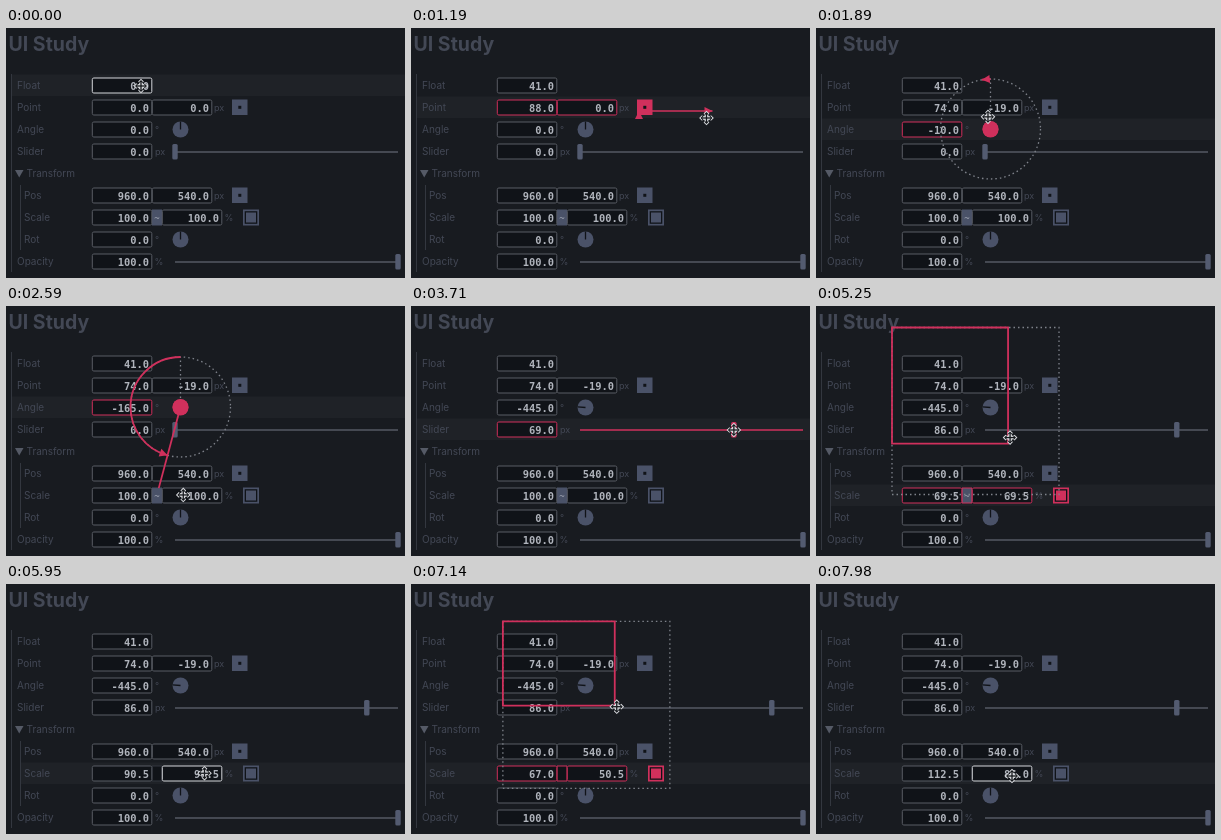
Recreate the animation shown at these times as an HTML page with a canvas. Size 399x250 px, loop 8 s.

```html
<!DOCTYPE html>
<html lang="en">
<head>
<meta charset="utf-8">
<title>UI Study</title>
<style>
html, body { margin: 0; width: 100%; height: 100%; overflow: hidden; background: #181b20; }
canvas { display: block; }
</style>
</head>
<body>
<canvas id="stage" width="399" height="250"></canvas>
<script>
const c = document.getElementById('stage').getContext('2d');
const LOOP = 8000, STEP = 70, GLIDE = 350, UNIT = 0.835, TAU = Math.PI * 2;
const BG = '#181b20', DARK = '#101318', DIM = '#434855', ICON = '#4a5268', RED = '#d0305c', EDGE = '#595d64';
const DIAL = { x: 174.5, y: 101 }, ORIGIN = { x: 228, y: 83 }, GRIP = { x: 243, y: 188.5 };
const SANS = 'Inter, Roboto, sans-serif', MONO = '"DejaVu Sans Mono", monospace';
const ROWS = ['float', 'point', 'angle', 'slider', 'transform', 'pos', 'scale', 'rot', 'opacity'];

const rowY = i => 57.5 + 22 * i;
const clamp = u => Math.min(1, Math.max(0, u));
const mix = (a, b, u) => a + (b - a) * u;
const swing = (u, from, to, amp = 0, halfTurns = 1) => mix(from, to, u) + amp * Math.sin(Math.PI * halfTurns * u);
const half = v => Math.round(v * 2) / 2;

// Angles run clockwise from straight up
function polar(deg, r) {
  const a = deg * TAU / 360;
  return [DIAL.x + Math.sin(a) * r, DIAL.y - Math.cos(a) * r];
}

// What the pointer does; it glides from each action to the next
const ACTIONS = [
  { name: 'float', start: 70, end: 280, at: v => [135 + v.float * UNIT, 58] },
  { name: 'point', start: 910, end: 1540, at: v => [ORIGIN.x - 6 + v.px * UNIT, ORIGIN.y + 7 + v.py * UNIT] },
  { name: 'angle', start: 1820, end: 3220, at: v => polar(v.angle - v.reach / 5, v.reach + 4) },
  { name: 'slider', start: 3430, end: 3780, at: v => [169 + 2.23 * v.slide, 124] },
  { name: 'scale', start: 4270, end: 5390, at: v => [v.right + 2, v.bottom - 6] },
  { name: 'link', start: 5600, end: 5775, at: () => [152, 189] },
  { name: 'scale', start: 6300, end: 7700, at: v => [v.right + 2, v.bottom + 1] },
  { name: 'rest', start: 7980, end: LOOP, at: () => [196, 192] }
];
const [FLOAT, POINT, ANGLE, SLIDER, EVEN, LINK, FREE] = ACTIONS;

function valuesAt(t) {
  const part = a => clamp((t - a.start) / (a.end - a.start));
  const point = part(POINT), turn = part(ANGLE), free = part(FREE);
  const linked = t < LINK.start, even = t < FREE.start;
  const both = swing(part(EVEN), 100, 90.5, 31.2, 2);
  const v = {
    linked,
    float: Math.round(41 * part(FLOAT)),
    px: Math.round(swing(point, 0, 74, 56)),
    py: Math.round(swing(point, 0, -19, 24.7, 2)),
    angle: Math.round(swing(turn, 0, -445, 80.7)),
    reach: 84 * clamp(turn * 2),
    slide: Math.round(86 * part(SLIDER)),
    sx: half(even ? both : swing(free, 90.5, 112.5, 62.4, 2)),
    sy: half(even ? both : swing(free, 90.5, 86, -39.2, 4))
  };
  const k = 2 * UNIT, base = linked ? 100 : 90.5;
  v.left = GRIP.x - base * k;
  v.top = GRIP.y - base * k;
  v.right = v.left + v.sx * k;
  v.bottom = v.top + v.sy * k;
  return v;
}

function pointerAt(t) {
  const i = ACTIONS.findIndex(a => t < a.end), next = ACTIONS[i], last = ACTIONS[i - 1];
  if (!last || t >= next.start) return next.at(valuesAt(t));
  const from = last.at(valuesAt(last.end - 1)), to = next.at(valuesAt(next.start));
  const u = clamp((t - last.end) / Math.min(GLIDE, next.start - last.end));
  return from.map((p, j) => mix(p, to[j], u));
}

function text(s, x, y, font, color, align = 'left') {
  c.font = font;
  c.fillStyle = color;
  c.textAlign = align;
  c.fillText(s, x, y);
}

function rect(x, y, w, h, color) {
  c.fillStyle = color;
  c.fillRect(x, y, w, h);
}

function frame(x, y, w, h, color, width = 1, radius = 0) {
  c.beginPath();
  c.roundRect(x, y, w, h, radius);
  c.strokeStyle = color;
  c.lineWidth = width;
  c.stroke();
}

function line(points, color, width = 1) {
  c.beginPath();
  points.forEach(p => c.lineTo(...p));
  c.strokeStyle = color;
  c.lineWidth = width;
  c.stroke();
}

function poly(points, color) {
  c.beginPath();
  points.forEach(p => c.lineTo(...p));
  c.fillStyle = color;
  c.fill();
}

function disc(x, y, r, color) {
  c.beginPath();
  c.arc(x, y, r, 0, TAU);
  c.fillStyle = color;
  c.fill();
}

function arc(from, to, back, color, width) {
  c.beginPath();
  c.arc(DIAL.x, DIAL.y, 50, from, to, back);
  c.strokeStyle = color;
  c.lineWidth = width;
  c.stroke();
}

// Arrowhead with its tip at x, y
function head(x, y, dir) {
  c.save();
  c.translate(x, y);
  c.rotate(dir);
  poly([[0, 0], [-8, -4], [-8, 4]], RED);
  c.restore();
}

function dotted(draw) {
  c.save();
  c.setLineDash([1.5, 3]);
  draw('#7f838b');
  c.restore();
}

const label = (s, x, y) => text(s, x, y + 3.5, '10px ' + SANS, DIM);
const unit = (s, x, y) => text(s, x, y + 3, '9px ' + SANS, DIM);

function field(x, y, value, active, pointer) {
  const over = pointer && pointer[0] > x && pointer[0] < x + 60 && Math.abs(pointer[1] - y) < 8;
  rect(x, y - 7.5, 60, 15, DARK);
  frame(x + 0.3, y - 7.5, 59.5, 15, active ? RED : over ? '#d4d6da' : EDGE, 1, 1.5);
  text(value.toFixed(1), x + 57, y + 4, 'bold 10.4px ' + MONO, '#b0b4bc', 'right');
}

function pointGrip(y, active) {
  rect(226, y - 8, 15.5, 15.5, active ? RED : ICON);
  rect(232.3, y - 1.7, 3, 3, DARK);
}

function scaleGrip(y, active) {
  const color = active ? RED : ICON;
  rect(237, y - 8, 16, 16, color);
  rect(238.7, y - 6.3, 12.6, 12.6, DARK);
  rect(240, y - 5, 10, 10, color);
}

function dial(y, deg, active) {
  disc(DIAL.x, y, 8, active ? RED : ICON);
  if (active) return;
  const a = deg * TAU / 360;
  line([[DIAL.x, y], [DIAL.x + Math.sin(a) * 8, y - Math.cos(a) * 8]], DARK, 1.3);
}

function slider(y, value, active) {
  line([[169, y + 0.5], [392, y + 0.5]], active ? RED : '#555963', 1.5);
  c.beginPath();
  c.roundRect(166.3 + 2.23 * value, y - 7.5, 5.4, 15.5, 1.5);
  c.fillStyle = active ? RED : '#535b70';
  c.fill();
}

function moveCursor(x, y) {
  c.save();
  c.translate(x, y);
  for (const [color, width] of [['#d9dbdf', 3.8], ['#16191d', 1.3]]) {
    for (let i = 0; i < 4; i++) {
      line([[0, 0], [5, 0]], color, width);
      line([[3.4, -1.8], [5.2, 0], [3.4, 1.8]], color, width * 0.8);
      c.rotate(TAU / 4);
    }
  }
  c.restore();
}

function floatGuide(v) {
  const x = 135 + v.float * UNIT;
  line([[135, 58], [x, 58]], RED, 1.6);
  head(x, 58, 0);
}

function pointGuide(v) {
  const { x, y } = ORIGIN, tipX = x + v.px * UNIT, tipY = y + v.py * UNIT;
  line([[tipX, y], [x, y], [x, tipY]], RED, 1.6);
  head(tipX, y, 0);
  head(x, tipY, v.py > 0 ? TAU / 4 : -TAU / 4);
}

function angleGuide(v) {
  const up = -TAU / 4, end = up + v.angle * TAU / 360, hub = [DIAL.x, DIAL.y];
  dotted(color => {
    arc(0, TAU, false, color, 1.3);
    line([hub, polar(0, 50)], color, 1.3);
  });
  arc(up, end, true, RED, 1.8);
  if (v.angle) head(...polar(v.angle, 50), end + up + 0.08);
  line([hub, polar(v.angle, v.reach)], RED, 1.8);
  disc(...hub, 8, RED);
}

function scaleGuide(v) {
  const size = 200 * UNIT;
  dotted(color => frame(v.left, v.top, size, size, color, 1.3));
  frame(v.left, v.top, v.right - v.left, v.bottom - v.top, RED, 1.8);
}

const GUIDES = { float: floatGuide, point: pointGuide, angle: angleGuide, scale: scaleGuide, slider() {} };

function draw(t) {
  const v = valuesAt(t), pointer = pointerAt(t);
  const drag = ACTIONS.find(a => a.name in GUIDES && t >= a.start && t < a.end && t > FLOAT.start)?.name;
  const on = name => drag === name;
  const hover = drag ? null : pointer;
  const row = drag ? ROWS.indexOf(drag) : Math.floor((pointer[1] - 46.5) / 22);
  const nested = i => i > 4 && i < 8;

  rect(0, 0, 399, 250, BG);
  text('UI Study', 2.5, 23, 'bold 19.5px ' + SANS, '#434855');

  const indent = nested(row) ? 15 : 6;
  rect(indent, rowY(row) - 11, 399 - indent, 21.5, '#1f2227');
  line([[5.5, 46], [5.5, 244]], '#33373f');
  line([[14.5, 157], [14.5, 222]], '#33373f');

  ROWS.forEach((name, i) => {
    const x = name === 'transform' ? 20.5 : nested(i) ? 18 : 11;
    label(name[0].toUpperCase() + name.slice(1), x, rowY(i));
  });
  poly([[9, 142], [17.5, 142], [13.2, 149.5]], '#555a66');

  const [yFloat, yPoint, yAngle, ySlider, , yPos, yScale, yRot, yOpacity] = ROWS.map((_, i) => rowY(i));

  field(86, yFloat, v.float, on('float'), hover);

  field(86, yPoint, v.px, on('point'), hover);
  field(146, yPoint, v.py, on('point'), hover);
  unit('px', 208, yPoint);
  pointGrip(yPoint, on('point'));

  field(86, yAngle, v.angle, on('angle'), hover);
  unit('°', 149, yAngle);
  dial(yAngle, v.angle, on('angle'));

  field(86, ySlider, v.slide, on('slider'), hover);
  unit('px', 149, ySlider);
  slider(ySlider, v.slide, on('slider'));

  field(86, yPos, 960, false, hover);
  field(146, yPos, 540, false, hover);
  unit('px', 208, yPos);
  pointGrip(yPos, false);

  rect(146, yScale - 7.5, 10, 15, v.linked ? ICON : DARK);
  if (v.linked) text('~', 151, yScale + 3, '9px ' + MONO, '#a0a5b2', 'center');
  frame(146, yScale - 7.5, 10, 15, on('scale') ? RED : v.linked ? ICON : '#33373f');
  field(86, yScale, v.sx, on('scale'), hover);
  field(156, yScale, v.sy, on('scale'), hover);
  unit('%', 218.5, yScale);
  scaleGrip(yScale, on('scale'));

  field(86, yRot, 0, false, hover);
  unit('°', 149, yRot);
  dial(yRot, 0, false);

  field(86, yOpacity, 100, false, hover);
  unit('%', 148.5, yOpacity);
  slider(yOpacity, 100, false);

  if (drag) GUIDES[drag](v);
  moveCursor(...pointer);
}

function tick(now) {
  draw(Math.floor(now % LOOP / STEP) * STEP);
  requestAnimationFrame(tick);
}
requestAnimationFrame(tick);
</script>
</body>
</html>
```
